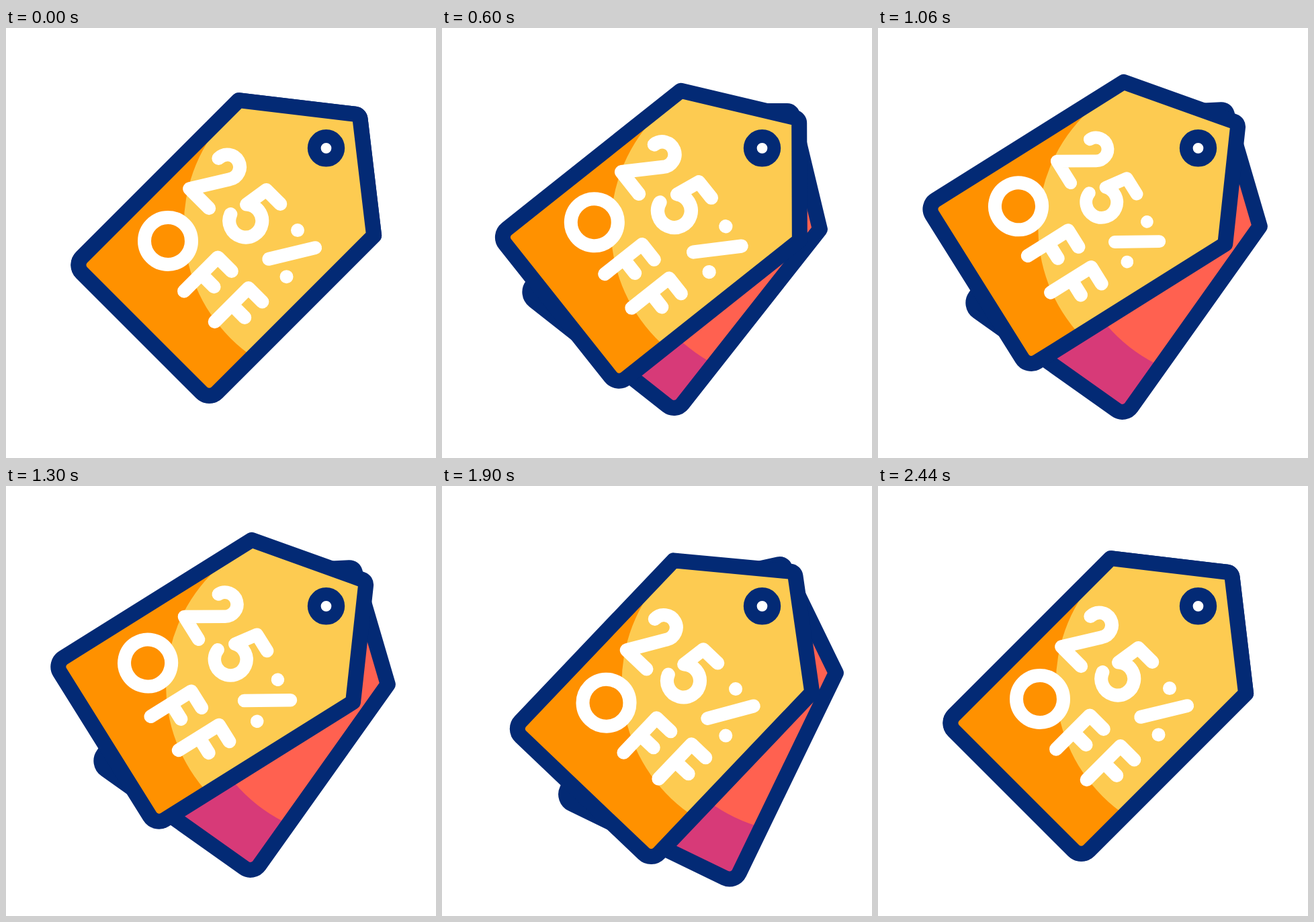
These frames come from a looping animation (640x640 px, 3 s). An HTML page:

```html
<!DOCTYPE html>
<html lang="en">
<head>
<meta charset="utf-8">
<title>Discount tag</title>
<style>
  html, body { margin: 0; height: 100%; overflow: hidden; background: #fff; }
  svg { display: block; width: 100vw; height: 100vh; }
  .ink { fill: none; stroke: #fff; stroke-width: 20; stroke-linecap: round; stroke-linejoin: round; }
</style>
</head>
<body>
<svg viewBox="0 0 640 640">
  <defs>
    <path id="body" d="M-5-66.5A8 8 0 0 1 5-66.5L142.3 41.7V372.3a16 16 0 0 1-16 16H-126.3a16 16 0 0 1-16-16V41.7Z"/>
    <clipPath id="inside"><use href="#body"/></clipPath>
    <g id="shine" clip-path="url(#inside)"><circle cx="99.4" cy="63.8" r="237"/></g>
    <use id="edge" href="#body" fill="none" stroke="#032a75" stroke-width="23" stroke-linejoin="round"/>
    <path id="letterF" d="M29 229H0V300M0 264H27"/>
  </defs>
  <!-- The origin is the hole, which both tags swing around. -->
  <g transform="translate(476.5 178.8)">
    <g id="back">
      <use href="#body" fill="#d73a78"/>
      <use href="#shine" fill="#ff6150"/>
      <use href="#edge"/>
    </g>
    <g id="front">
      <use href="#body" fill="#ff9100"/>
      <use href="#shine" fill="#fdcb51"/>
      <use href="#edge"/>
      <g id="percent" class="ink">
        <path d="M-102.5 124A18.5 18.5 0 1 1-68.7 134.3L-101 186.5H-60"/>
        <path d="M10.5 107H-19L-24.5 143A24.5 24.5 0 1 1-31 170"/>
        <path d="M56.4 177 93.3 116.5M56.4 116.5h.01M93.6 177h.01"/>
      </g>
      <g class="ink">
        <g class="letter"><circle cx="-68.8" cy="264.2" r="35"/></g>
        <g class="letter"><use href="#letterF" x="1"/></g>
        <g class="letter"><use href="#letterF" x="65.5"/></g>
      </g>
    </g>
    <circle r="17.8" fill="#fff" stroke="#032a75" stroke-width="19.8"/>
  </g>
</svg>
<script>
const LOOP = 3000;
const [back, front, percent] = ['back', 'front', 'percent'].map(id => document.getElementById(id));
const letters = document.querySelectorAll('.letter');

// Progress from 0 to 1 between two times.
const ramp = (t, from, to) => Math.min(1, Math.max(0, (t - from) / (to - from)));
const easeInOut = (...span) => { const u = ramp(...span); return u * u * (3 - 2 * u); };
const easeOut = (...span) => 1 - (1 - ramp(...span)) ** 3;

// A letter drops, bounces above its line and settles.
const hop = t => 18 * easeInOut(t, 0, 210) - 26 * easeInOut(t, 210, 480) + 8 * easeInOut(t, 480, 680);

function draw(now) {
  const t = now % LOOP;
  const set = (el, value) => el.setAttribute('transform', value);

  // Both tags share one swing; the front one also fans away from the back one.
  const sway = easeInOut(t, 1740, 2040), settle = easeInOut(t, 2040, 2380);
  const swing = -9.6 * easeInOut(t, 120, 870) - 17.4 * sway + 27 * settle;
  const fan = 22.6 * easeOut(t, 400, 1180) - 8.8 * sway - 13.8 * settle;
  set(back, `rotate(${45 + swing})`);
  set(front, `rotate(${45 + swing + fan})`);

  const scale = 1 + 0.1 * easeInOut(t, 120, 400) - 0.18 * easeInOut(t, 400, 820)
              + 0.08 * easeInOut(t, 820, 1600);
  set(percent, `translate(-8 216) scale(${scale}) translate(8 -216)`);
  letters.forEach((el, i) => set(el, `translate(0 ${hop(t - 960 - i * 240)})`));
}

let start;
function tick(now) {
  start ??= now;
  draw(now - start);
  requestAnimationFrame(tick);
}
draw(0);
requestAnimationFrame(tick);
</script>
</body>
</html>
```
